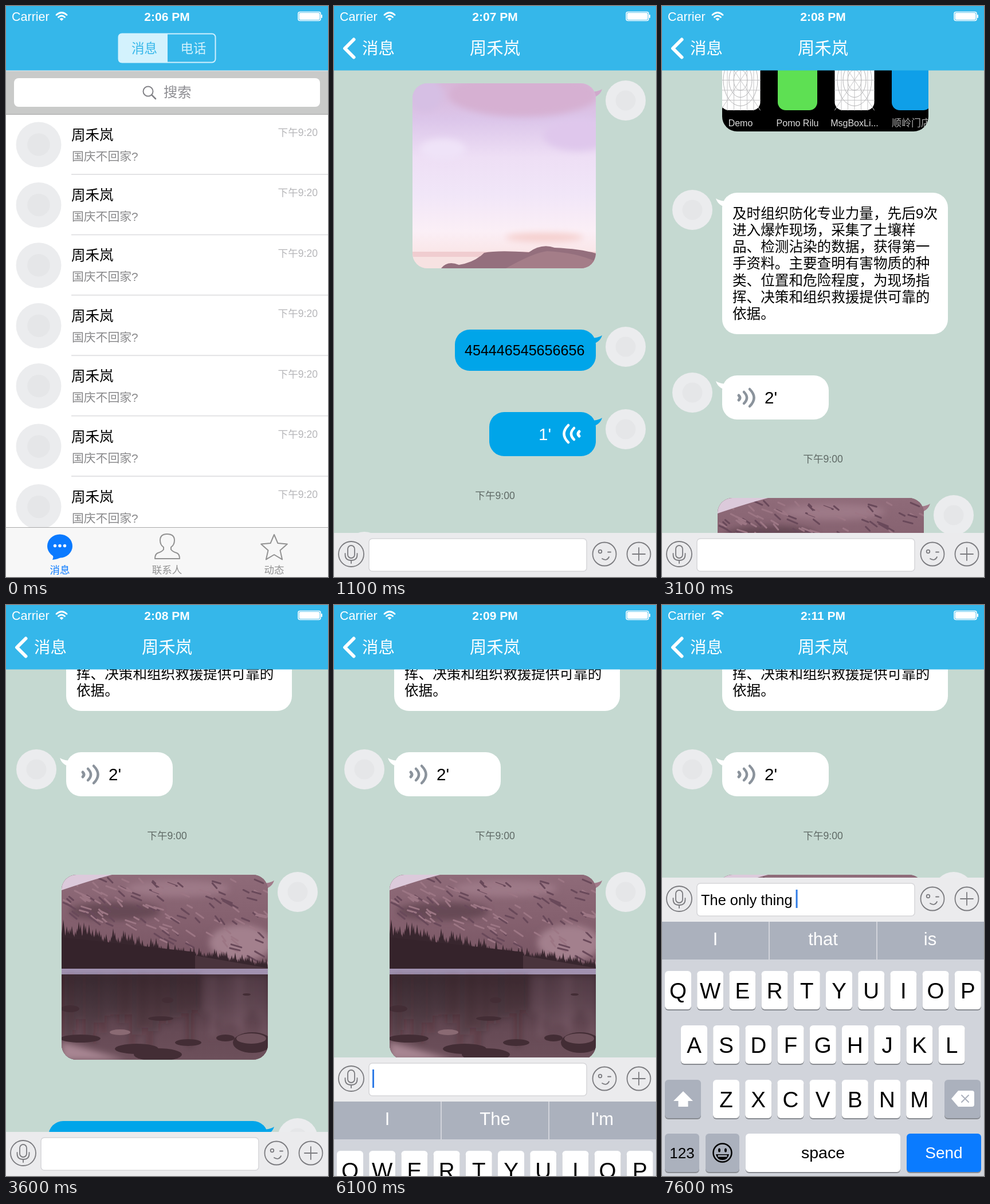
An HTML page that plays this animation: 562x997 px, repeating every 8000 ms.

```html
<!DOCTYPE html>
<html lang="zh-CN">
<head>
<meta charset="utf-8">
<title>Chat</title>
<style>
html, body { margin: 0; width: 100%; height: 100%; overflow: hidden; background: #fff; }
svg { display: block; width: 100%; height: 100%; }
text { font-family: "Liberation Sans", "Noto Sans CJK SC", "Noto Sans CJK", sans-serif; white-space: pre; }
.mid { text-anchor: middle; }
.end { text-anchor: end; }
.bold { font-weight: bold; }
.light { font-weight: 300; }
.line { fill: none; stroke-linecap: round; stroke-linejoin: round; }
</style>
</head>
<body>
<svg id="stage" viewBox="0 0 562 997" preserveAspectRatio="none"></svg>
<script>
const BAR = '#35b7ea', BLUE = '#00a5e9', NAME = '周禾岚';
const text = (x, y, size, str, fill = '#000', cls = '', id = '') =>
  `<text x="${x}" y="${y}" font-size="${size}" fill="${fill}" class="${cls}" id="${id}">${str}</text>`;
const rect = (x, y, w, h, fill, rx = 0, more = '') =>
  `<rect x="${x}" y="${y}" width="${w}" height="${h}" rx="${rx}" fill="${fill}" ${more}/>`;
const circle = (x, y, r, fill, more = '') => `<circle cx="${x}" cy="${y}" r="${r}" fill="${fill}" ${more}/>`;
const oval = (x, y, rx, ry, fill, more = '') =>
  `<ellipse cx="${x}" cy="${y}" rx="${rx}" ry="${ry}" fill="${fill}" ${more}/>`;
const path = (d, fill, more = '') => `<path d="${d}" fill="${fill}" ${more}/>`;
const line = (d, color, width = 2, id = '') =>
  `<path class="line" d="${d}" stroke="${color}" stroke-width="${width}" id="${id}"/>`;
const shift = (x, y, body, id = '') => `<g transform="translate(${x} ${y})" id="${id}">${body}</g>`;
const mirror = body => `<g transform="matrix(-1 0 0 1 562 0)">${body}</g>`;
const soft = body => `<g filter="url(#soft)">${body}</g>`;
const gradient = (id, ...colors) => `<linearGradient id="${id}" x2="0" y2="1">${colors.map((c, i) =>
  `<stop offset="${i / (colors.length - 1)}" stop-color="${c}"/>`).join('')}</linearGradient>`;
const repeat = (n, make) => Array.from({ length: n }, (_, i) => make(i)).join('');
const random = n => { const v = Math.sin(n * 12.9898) * 43758.5453; return v - Math.floor(v); };

const avatar = (x, y, r) => circle(x, y, r, '#ebecee') + circle(x, y, r * .5, '#e5e6e8');

// ---- conversation list ----
const row = i => shift(0, 105.4 * i,
  avatar(57, 242, 39.5) +
  text(114, 233.5, 24.5, NAME) +
  text(115, 269.5, 20.8, '国庆不回家?', '#88888a', 'light') +
  text(544, 227, 17.6, '下午9:20', '#b6b6b9', 'end light') +
  rect(114, 293, 448, 2, '#e3e3e5'));

const starPoints = repeat(10, i => {
  const r = i % 2 ? 11 : 24, a = i * Math.PI / 5;
  return `${468 + r * Math.sin(a)},${947 - r * Math.cos(a)} `;
});

const tabBar = rect(0, 910, 562, 87, '#f7f7f7') + rect(0, 910, 562, 1, '#a9a9a9') +
  oval(94, 943, 22, 20.5, '#0a7aff') + path('M80 955Q84 962 81 967Q91 966 97 962Z', '#0a7aff') +
  repeat(3, i => circle(85.5 + 8.5 * i, 942.5, 2.7, '#fff')) +
  line('M275 945Q269 941 269 933Q269 922 281 922Q294 922 294 933Q294 941 288 945V949Q291 953 298 955Q303 957 303 965H260Q260 957 265 955Q272 953 275 949Z', '#929292') +
  `<polygon class="line" points="${starPoints}" stroke="#929292" stroke-width="2"/>` +
  text(94, 991, 17.5, '消息', '#0a7aff', 'mid') +
  text(281, 991, 17.5, '联系人', '#929292', 'mid') +
  text(468, 991, 17.5, '动态', '#929292', 'mid');

const list = rect(0, 112, 562, 885, '#fff') +
  rect(0, 189, 562, 107, '#d9d9d9', 0, 'id="highlight"') +
  repeat(7, row) +
  rect(0, 112, 562, 78, '#c9cac9') + rect(0, 112, 562, 1.5, '#e3eef2') + rect(0, 188.5, 562, 1.5, '#b4b5b4') +
  rect(14, 126, 534, 50, '#fff', 8) +
  circle(248, 149, 8.5, 'none', 'stroke="#828287" stroke-width="2"') +
  line('M254.5 155.5L261 162', '#828287', 2.5) +
  text(275, 159, 24.3, '搜索', '#8e8e93') + tabBar;

const listNav = rect(196.5, 48.5, 169, 50, 'none', 6, 'stroke="#d0effd" stroke-width="2"') +
  path('M202 48H282V99H202Q196 99 196 93V54Q196 48 202 48Z', '#d3f2fd') +
  text(241.5, 82, 22.5, '消息', BAR, 'mid') + text(327, 82, 22.5, '电话', '#d3f2fd', 'mid');

// ---- chat ----
const waves = (y, color, id) => shift(0, y,
  line('M134 -4Q138 0 134 4', color, 5) +
  line('M143 -10Q153 0 143 10', color, 4.5, id + 1) +
  line('M153 -15Q168 0 153 15', color, 4.5, id + 2));

function bubble(right, y, w, h, fill, body = '', tailFill = fill) {
  const x = right ? 457 - w : 105, id = 'clip' + y;
  const tail = path(`M94 ${y + 10}q7 5 22 5v10q-17 0-22-15z`, tailFill);
  return avatar(right ? 509 : 53, y + 30, 35) + (right ? mirror(tail) : tail) +
    `<clipPath id="${id}">${rect(x, y, w, h, '#000', 26)}</clipPath>` +
    `<g clip-path="url(#${id})">${rect(x, y, w, h, fill)}${body}</g>`;
}

const stamp = y => text(281, y, 17.6, '下午9:00', '#5f6965', 'mid');

const sky = soft(
    oval(330, 155, 130, 38, '#d6b0d2') + oval(425, 225, 60, 28, '#dfc7ec') +
    oval(190, 250, 40, 18, '#efe3f8') + oval(160, 155, 30, 30, '#d6bfe4') +
    oval(367, 404, 68, 8, '#f5cfcd')) +
  rect(137, 429, 320, 9, '#f0cdd0') + rect(137, 438, 320, 20, '#f7e2e2') +
  path('M187 458Q198 444 218 452Q245 448 262 431Q285 426 340 430Q362 414 385 422Q430 424 457 432V458Z', '#946f7d') +
  path('M300 458Q350 430 372 428Q420 430 457 446V458Z', '#a47d88');

// Home-screen picture
const grid = (x, y) => line(
  repeat(5, i => `M${x + 11.5 * (i + 1)} ${y}v105M${x} ${y + 17.5 * (i + 1)}h69`) +
  `M${x} ${y}l69 105M${x + 69} ${y}l-69 105`, '#c3c3c5', 1) +
  [[12, 18], [20, 30], [30, 45]].map(([a, b]) =>
    oval(x + 34.5, y + 52.5, a, b, 'none', 'stroke="#b5b5b7"')).join('');
const tile = (col, y, fill, label, extra = '') => {
  const x = 102.5 + 99.5 * col;
  return rect(x, y, 69, 105, fill, 14) + extra +
    (label ? text(x + 34.5, y + 133, 16, label, '#dcdcdc', 'mid') : '');
};
const home = tile(0, 519, '#fff', '', circle(137, 571, 26, '#2f9be0')) +
  text(106, 652, 16, 'ock Puzzle', '#dcdcdc') +
  tile(1, 519, '#757377', 'Extras', rect(210, 530, 17, 25, '#dfe2e5', 4)) +
  tile(2, 519, '#231b1d', 'Wrist Panel') +
  tile(3, 519, '#fff', '', grid(401, 519)) + text(392, 652, 16, 'WelcomeVie...', '#dcdcdc') +
  tile(0, 673, '#fff', 'Demo', grid(102.5, 673)) +
  tile(1, 673, '#5ee053', 'Pomo Rilu') +
  tile(2, 673, '#fff', 'MsgBoxLi...', grid(301.5, 673)) +
  tile(3, 673, '#0f9fe8', '') + text(401, 806, 17, '顺岭门店版', '#aaa');

// Lake picture
const rockFace = repeat(150, i => {
  const x = 100 + 360 * random(i + 9), y = 476 + (60 + (x - 97) * .28) * random(i + 90);
  return line(`M${x} ${y}l${6 + 12 * random(i)} ${4 + 6 * random(i + 5)}`, i % 2 ? '#9c7684' : '#69495a', 3);
});
const trees = repeat(120, i => {
  const x = 97 + 3 * i, base = 588 + i * .42, top = base - 12 - 30 * random(i) * (1 - i / 170);
  return `M${x - 6} ${base + 12}L${x} ${top}L${x + 6} ${base + 12}Z`;
});
const reflections = repeat(36, i =>
  rect(97 + 10 * i, 646, 5 + 5 * random(i), 60 + 80 * random(i + 40), i > 24 ? '#9a7884' : '#2e1f26', 0, 'opacity=".3"'));
const lake = rect(97, 471, 360, 166, 'url(#cliff)') +
  soft(oval(300, 495, 90, 14, '#9d7987') + oval(410, 590, 55, 32, '#a3808d') + oval(190, 535, 80, 16, '#664855')) +
  rockFace +
  path('M97 471H185Q150 480 97 498Z', '#dccadb') +
  path(trees, '#38262e') + path('M97 580L330 606V637H97Z', '#35232b') +
  path('M330 612L457 634V637H330Z', '#4a343d') +
  rect(97, 635, 360, 10, '#a293b2') + rect(97, 645, 360, 150, 'url(#water)') +
  soft(reflections + path('M97 762L210 795H97Z', '#a78592')) +
  [[130, 757, 35, 7], [228, 775, 38, 9], [265, 785, 42, 11], [318, 764, 23, 6], [383, 756, 16, 6],
   [430, 764, 34, 18], [270, 722, 22, 4], [282, 690, 10, 5], [112, 705, 16, 6], [420, 680, 7, 2]]
    .map(r => oval(...r, '#432d35')).join('') +
  oval(199, 746, 18, 5, '#8a6a73') + oval(428, 757, 26, 9, '#6e515b');

const news = ['及时组织防化专业力量，先后9次', '进入爆炸现场，采集了土壤样', '品、检测沾染的数据，获得第一',
  '手资料。主要查明有害物质的种', '类、位置和危险程度，为现场指', '挥、决策和组织救援提供可靠的', '依据。'];

const messages = bubble(true, 135, 320, 323, 'url(#sky)', sky, '#cfa9cc') +
  bubble(true, 565, 246, 72, BLUE, text(228, 610, 25.1, '454446545656656')) +
  bubble(true, 709, 186, 77, BLUE, text(357, 758, 29.5, "1'", '#fff') + mirror(waves(747, '#fff', 'sent'))) +
  stamp(861) +
  bubble(false, 923, 360, 295, '#000', shift(0, 403, home)) +
  bubble(false, 1325, 394, 247, '#fff', news.map((s, i) =>
    text(123, 1369.5 + 29.3 * i, 24.6, s, '#000', 'light')).join('')) +
  bubble(false, 1644, 186, 77, '#fff', waves(1683, '#8b939c', 'wave') + text(179, 1693, 29.5, "2'")) +
  stamp(1796) +
  bubble(true, 1858, 360, 323, '#6d4c59', shift(0, 1387, lake), '#a27b8a') +
  bubble(true, 2288, 383, 72, BLUE);

const chatNav = line('M34.5 58.5L19 74L34.5 89.5', '#fff', 6) +
  text(49, 84, 28.5, '消息', '#fff', 'light') + text(281, 84, 29.3, NAME, '#fff', 'mid');

// ---- input bar and keyboard, measured from the bar's top ----
const INK = '#7b7b7f', OUTLINE = `stroke="${INK}" stroke-width="1.8"`;
const ring = (x, r) => circle(x, 37, r, 'none', OUTLINE);
const inputBar = rect(0, 0, 562, 78, '#ebebed') +
  ring(30, 22) + rect(24, 22, 12, 22, 'none', 6, OUTLINE) +
  line('M19.5 36V38Q19.5 48 30 48Q40.5 48 40.5 38V36M30 48V53', INK, 1.8) +
  rect(61, 10, 380, 57, '#fff', 6, 'stroke="#d6d6d9" stroke-width="1.5"') +
  ring(472, 20.5) + circle(464.5, 32.5, 2.8, 'none', OUTLINE) +
  line('M478 33.5H483M468 45Q476 50 480 42', INK, 1.8) +
  ring(532, 20.5) + line('M521 37H543M532 26V48', INK, 1.8) +
  text(68, 48, 25.4, '', '#000', '', 'typed') + rect(67, 21, 3, 32, '#2f7be6', 0, 'id="cursor"');

const GREY = '#abb1bd';
const key = (x, y, w, fill, label = '', size = 38.5, color = '#000', id = '') =>
  rect(x, y + 2, w, 67, '#888b91', 6) + rect(x, y, w, 67, fill, 6, id && `id="${id}"`) +
  text(x + w / 2, y + (size > 30 ? 48 : 42.5), size, label, color, 'mid');
const keyRow = (letters, x, y) => [...letters].map((c, i) => key(x + 56.2 * i, y, 46, '#fff', c)).join('');

const keyboard = rect(0, 77, 562, 67, GREY) + rect(0, 143, 562, 380, '#d1d4db') +
  rect(186, 77, 2, 66, '#d1d4db') + rect(374, 77, 2, 66, '#d1d4db') +
  [93, 281, 468].map((x, i) => text(x, 118, 31, '', '#fff', 'mid', 'guess' + i)).join('') +
  keyRow('QWERTYUIOP', 5, 163) + keyRow('ASDFGHJKL', 33, 258) + keyRow('ZXCVBNM', 89, 353) +
  key(5, 353, 63, GREY, '', 0, '', 'shiftKey') +
  path('M37 373L54 390H45.5V400H28.5V390H20Z', '#fff', 'id="shiftArrow"') +
  key(493, 353, 63, GREY) + path('M505 386L517 372H541Q545 372 545 376V396Q545 400 541 400H517Z', '#fff') +
  line('M523 380L535 392M535 380L523 392', GREY, 2) +
  key(5, 447, 60, GREY, '123', 26) + key(76, 447, 59, GREY) +
  circle(105.5, 480.5, 16, 'none', 'stroke="#000" stroke-width="2.5"') +
  oval(100, 476, 2, 3.5, '#000') + oval(111, 476, 2, 3.5, '#000') +
  path('M94 483H117Q115 493 105.5 493Q96 493 94 483Z', '#000') + rect(97.5, 484.5, 16, 3, GREY) +
  key(146, 447, 270, '#fff', 'space', 28.5) + key(427, 447, 130, '#0a7bff', 'Send', 28, '#fff');

const statusBar = text(10, 25.5, 21.5, 'Carrier', '#fff') +
  line('M88 15.5Q97 7.5 106 15.5M91.5 19.5Q97 14.5 102.5 19.5', '#fff', 2.8) +
  path('M93.5 22.5Q97 19.5 100.5 22.5L97 26Z', '#fff') +
  text(281, 25.5, 21, '', '#fff', 'mid bold', 'clock') +
  rect(510, 10.5, 39, 15, 'none', 3, 'stroke="#fff" stroke-width="1.5"') +
  rect(511.5, 12, 36, 12, '#fff', 2) + rect(550, 15, 2, 6, '#fff', 1);

stage.innerHTML = `<defs>
  ${gradient('sky', '#d8b6d8', '#dcc6ea', '#eedff5', '#f1e6f8', '#fbeff6', '#f9dfdd')}
  ${gradient('cliff', '#8f6b79', '#84606e', '#745260')}
  ${gradient('water', '#3d2932', '#4f3842', '#664a55', '#6d505b')}
  <filter id="soft" x="-50%" y="-100%" width="200%" height="300%"><feGaussianBlur stdDeviation="6"/></filter></defs>` +
  shift(0, 0, list, 'list') +
  shift(0, 0, rect(0, 112, 562, 885, '#c5d9d1') + shift(0, 0, messages, 'scroller') +
    shift(0, 920, inputBar + keyboard, 'dock'), 'chat') +
  rect(0, 0, 562, 112.5, BAR) + shift(0, 0, listNav, 'listNav') + shift(0, 0, chatNav, 'chatNav') + statusBar;

const $ = id => document.getElementById(id);
const move = (id, x, y) => $(id).setAttribute('transform', `translate(${x} ${y})`);
const show = (id, on) => $(id).setAttribute('visibility', on ? 'visible' : 'hidden');
// Each track is a list of [start time, value]; values hold until the next start.
const at = (t, track) => track.filter(([start]) => start <= t).pop()[1];

const tracks = {
  push: [[0, 0], [700, .4], [900, .93], [1100, 1]],
  scroll: [[0, 0], [1600, 200], [2100, 403], [2600, 719], [3100, 999], [3600, 1387]],
  dock: [[0, 920], [5600, 868], [6100, 790], [6200, 600], [6400, 476]],
  clock: [[0, '2:06 PM'], [700, '2:07 PM'], [3100, '2:08 PM'], [5100, '2:09 PM'], [6200, '2:10 PM'], [7100, '2:11 PM']],
  typed: [[0, ''], [6600, 'The '], [7100, 'The only '], [7600, 'The only thing ']],
  guesses: [[0, ['I', 'The', "I'm"]], [6600, ['best', 'same', 'only']],
    [7100, ['one', 'thing', 'time']], [7600, ['I', 'that', 'is']]]
};

function draw() {
  const t = performance.now() % 8000;
  const now = name => at(t, tracks[name]);
  const push = now('push'), capital = t < 6600;
  move('list', -170 * push, 0);
  move('chat', 562 * (1 - push), 0);
  move('chatNav', 200 * (1 - push), 0);
  $('listNav').setAttribute('opacity', 1 - push);
  $('chatNav').setAttribute('opacity', push);
  show('highlight', t >= 500);
  move('scroller', 0, -now('scroll'));
  show('wave1', t < 4100 || t >= 4600);
  show('wave2', t < 4100 || t >= 5100);
  move('dock', 0, now('dock'));
  show('cursor', t >= 5600);
  $('clock').textContent = now('clock');
  $('typed').textContent = now('typed');
  $('cursor').setAttribute('x', 67 + $('typed').getComputedTextLength());
  now('guesses').forEach((word, i) => { $('guess' + i).textContent = word; });
  $('shiftKey').setAttribute('fill', capital ? '#fff' : GREY);
  $('shiftArrow').setAttribute('fill', capital ? '#000' : '#fff');
  requestAnimationFrame(draw);
}
draw();
</script>
</body>
</html>
```
